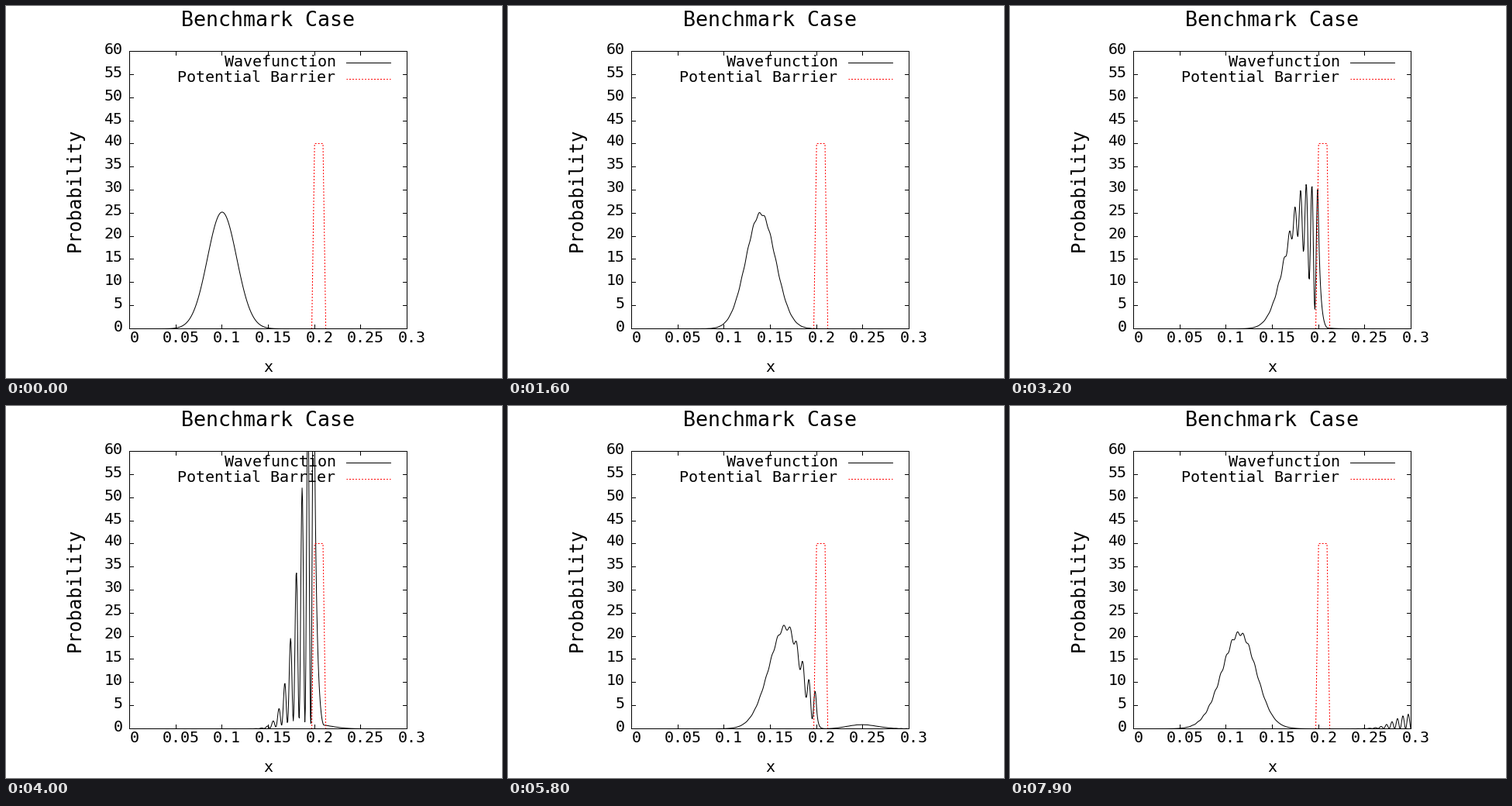
Recreate the animation shown at these times as a matplotlib script. Size 640 px wide and 480 px high, loop 8000 ms.

```python
import matplotlib.pyplot as plt
import numpy as np
from matplotlib.animation import FuncAnimation
from matplotlib.patches import Rectangle

W, H, DPI = 640, 480, 100
FRAMES, INTERVAL = 80, 100
LEFT, RIGHT, TOP, BOTTOM = 159, 517, 58, 416
X_MAX, Y_MAX = 0.3, 60
PX = 72 / DPI
ADVANCE = 0.602  # character width of the mono font, in em

# Tunnelling of a Gaussian packet (hbar = m = 1)
DX, DT, STEPS = 0.0005, 2e-7, 25
K0, X0, SIGMA2 = 500, 0.1, 0.001
V0, WALL, THICK = 1.5e5, 0.2, 0.01

plt.rcParams["font.family"] = "DejaVu Sans Mono"
plt.rcParams["path.simplify"] = False


def px(x):
    return LEFT + np.asarray(x) / X_MAX * (RIGHT - LEFT)


def py(y):
    return BOTTOM - np.asarray(y) / Y_MAX * (BOTTOM - TOP)


def in_barrier(x):
    return (x > WALL - 1e-6) & (x < WALL + THICK + 1e-6)


def simulate():
    """Leapfrog the real and imaginary parts; one density row per frame."""
    x = np.arange(int(round(X_MAX / DX)) + 1) * DX
    v = np.where(in_barrier(x), V0, 0.0)
    envelope = np.exp(-(x - X0) ** 2 / SIGMA2)
    envelope /= np.sqrt(np.sum(envelope ** 2) * DX)
    re, im = envelope * np.cos(K0 * x), envelope * np.sin(K0 * x)
    re[[0, -1]] = im[[0, -1]] = 0

    def hamilton(f):
        out = np.zeros_like(f)
        out[1:-1] = (-0.5 * (f[2:] - 2 * f[1:-1] + f[:-2]) / DX ** 2
                     + v[1:-1] * f[1:-1])
        return out

    rows = []
    for _ in range(FRAMES):
        rows.append(re ** 2 + im ** 2)
        for _ in range(STEPS):
            re = re + DT * hamilton(im)
            im = im - DT * hamilton(re)
    return x, np.array(rows)


x, density = simulate()

# Integer data coordinates are pixel centres
fig = plt.figure(figsize=(W / DPI, H / DPI), dpi=DPI, facecolor="white")
ax = fig.add_axes([0, 0, 1, 1])
ax.set_xlim(-0.5, W - 0.5)
ax.set_ylim(H - 0.5, -0.5)
ax.axis("off")


def line(xs, ys, color="black", z=2, **kw):
    return ax.plot(xs, ys, color=color, lw=PX, zorder=z, snap=False,
                   solid_capstyle="projecting", dash_capstyle="butt", **kw)[0]


def label(text, x, y, size=20, align=0.5):
    ax.text(x - align * len(text) * ADVANCE * size, y, text,
            fontsize=size * PX, ha="left", va="baseline", zorder=5)


# Frame, ticks and their labels
line([LEFT, RIGHT, RIGHT, LEFT, LEFT],
     [TOP, TOP, BOTTOM, BOTTOM, TOP], z=4, solid_joinstyle="miter")
for value in range(0, 61, 5):
    y = round(float(py(value)))
    line([LEFT, LEFT + 5], [y, y], z=4)
    line([RIGHT - 5, RIGHT], [y, y], z=4)
    label(str(value), 150, y + 3, align=1)
for i in range(7):
    t = round(float(px(i * 0.05)))
    line([t, t], [BOTTOM - 5, BOTTOM], z=4)
    line([t, t], [TOP, TOP + 5], z=4)
    label(f"{i * 0.05:.2g}", t + 6, 434)

label("Benchmark Case", 338, 26, 26.67)
label("x", 337.5, 471)
ax.text(95, 316.5, "Probability", fontsize=24 * PX, rotation=90,
        rotation_mode="anchor", ha="left", va="baseline")

# Key
DOTS = (0.5, (2, 2))
label("Wavefunction", 425.5, 77, align=1)
label("Potential Barrier", 425.5, 98, align=1)
line([439, 496], [73, 73])
line([439, 496], [94, 94], "red", ls=DOTS)

# Curves
clip = Rectangle((LEFT, TOP), RIGHT - LEFT, BOTTOM - TOP,
                 transform=ax.transData)
sample = np.linspace(0, X_MAX, 100)
barrier = np.where(in_barrier(sample), 40, 0)
edge = np.flatnonzero(barrier)
span = slice(edge[0] - 1, edge[-1] + 2)
line(px(sample[span]), py(barrier[span]).round(), "red", z=3, ls=DOTS)
wave = line([], [])
wave.set_clip_path(clip)


def update(i):
    wave.set_data(px(x), py(density[i]))
    return (wave,)


anim = FuncAnimation(fig, update, frames=FRAMES, interval=INTERVAL,
                     init_func=lambda: update(0), repeat=True)
plt.show()
```
